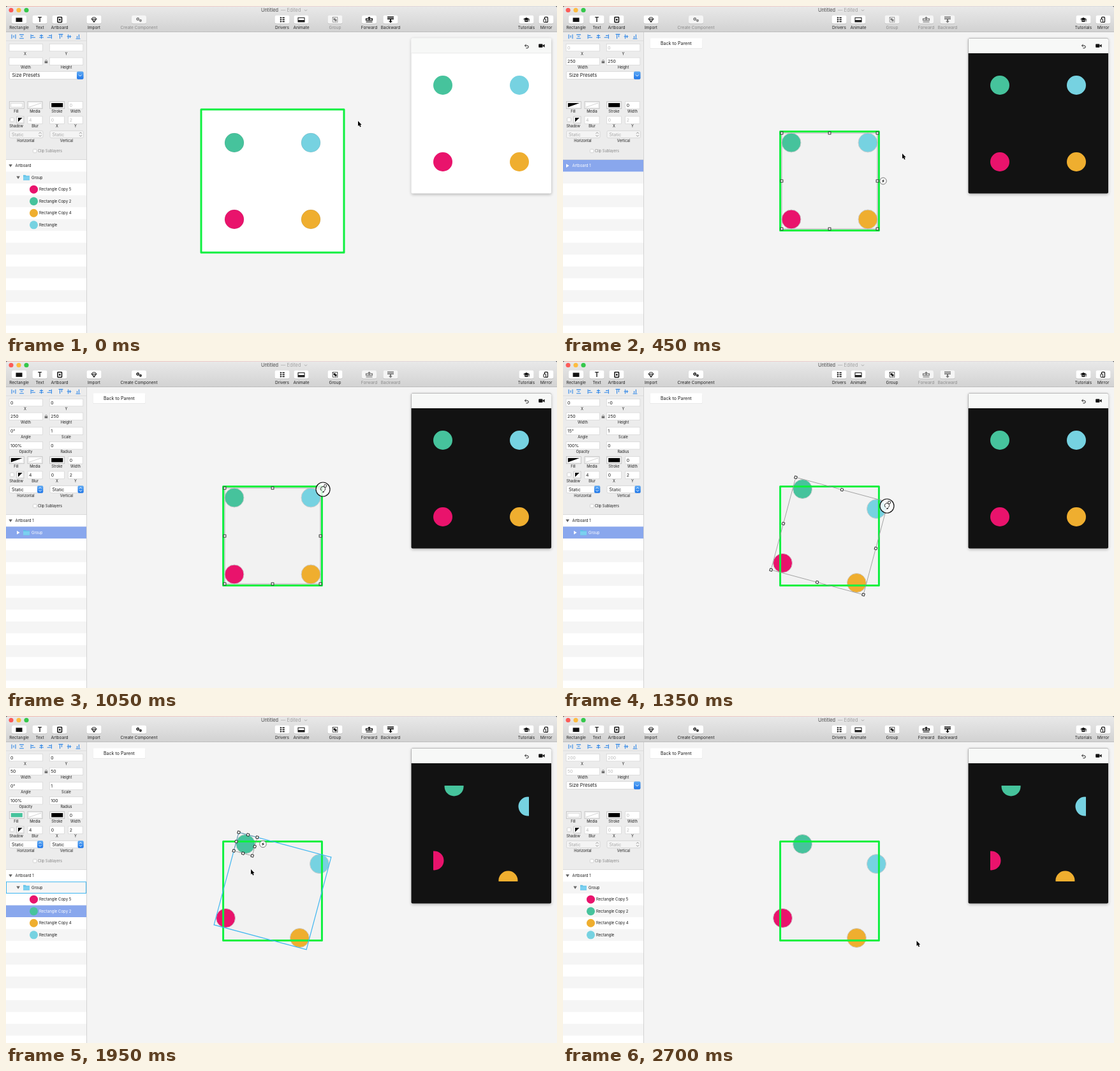
An HTML page that plays this animation: 864 by 512 pixels, repeating every 2.85 s.

```html
<!DOCTYPE html>
<html lang="en">
<head>
<meta charset="utf-8">
<title>Untitled</title>
<style>
html, body { margin: 0; width: 100%; height: 100%; overflow: hidden; background: #f4f4f4; }
svg { display: block; width: 864px; height: 512px; font-family: Inter, "Open Sans", sans-serif; }
</style>
</head>
<body>
<svg viewBox="0 0 864 512">
  <defs>
    <linearGradient id="bar" x2="0" y2="1"><stop stop-color="#e9e9e9"/><stop offset="1" stop-color="#d2d2d2"/></linearGradient>
    <linearGradient id="edge"><stop stop-color="#f3b9ae"/><stop offset=".5" stop-color="#ecd3d2"/><stop offset="1" stop-color="#d9dde0"/></linearGradient>
    <linearGradient id="pop" x2="0" y2="1"><stop stop-color="#5fabf5"/><stop offset="1" stop-color="#1f76e8"/></linearGradient>
    <filter id="soft" x="-10%" y="-10%" width="120%" height="120%"><feGaussianBlur stdDeviation="2.5"/></filter>
    <clipPath id="crop"><rect x="-75" y="-75" width="150" height="150"/></clipPath>
  </defs>
  <g id="stage"></g>
</svg>
<script>
const STEP = 150, LOOP = 2850;
const BLUE = '#2f86e6', HOVER = '#3fb6f0', GREEN = '#0df03f', PICK = '#89a7ed';
const INK = '#1c1c1c', DIM = '#a6a6a6';

// Dots in list order, offset from the group centre
const dots = [
  { name: 'Rectangle Copy 5', color: '#e9136c', x: -60, y: 60, pos: ['-0', '200'] },
  { name: 'Rectangle Copy 2', color: '#46c39c', x: -60, y: -60, pos: ['0', '0'] },
  { name: 'Rectangle Copy 4', color: '#efae2f', x: 60, y: 60, pos: ['200', '200'] },
  { name: 'Rectangle', color: '#76d2e1', x: 60, y: -60, pos: ['200', '-0'] }
];
const PINK = 0, TEAL = 1, AMBER = 2, SKY = 3;

// sel: selected layer, tip: pointer, hover: group outline
const steps = [
  { tip: [552, 180] },
  { tip: [549, 192] },
  { sel: 'group', tip: [541, 212] },
  { sel: 'board', tip: [532, 231] },
  { sel: 'group', tip: [512, 222] },
  { sel: 'group', tip: [492, 210], hover: true },
  { sel: 'group', tip: [494, 203] },
  { sel: 'group', spin: [497, 201] },
  { sel: 'group', spin: [507, 224] },
  { sel: 'group', spin: [508, 227] },
  { sel: SKY, tip: [495, 252], hover: true },
  { sel: SKY, tip: [483.5, 229] },
  { sel: TEAL, tip: [378, 199] },
  { sel: TEAL, tip: [384, 240], hover: true },
  { sel: PINK, tip: [347, 315] },
  { sel: PINK, tip: [372, 304], hover: true },
  { sel: PINK, tip: [424, 329], hover: true },
  { sel: AMBER, tip: [461, 345] },
  { tip: [554.5, 352], last: ['200', '200', '50', '50'] }
];

const rect = (x, y, w, h, fill, more = '') => `<rect x="${x}" y="${y}" width="${w}" height="${h}" fill="${fill}" ${more}/>`;
const circle = (x, y, r, fill, more = '') => `<circle cx="${x}" cy="${y}" r="${r}" fill="${fill}" ${more}/>`;
const path = (d, fill, more = '') => `<path d="${d}" fill="${fill}" ${more}/>`;
const line = (d, color, w = 1, more = '') => path(d, 'none', `stroke="${color}" stroke-width="${w}" ${more}`);
const at = (x, y, body, more = '') => `<g transform="translate(${x} ${y}) ${more}">${body}</g>`;
// y is the middle of the line
const text = (s, x, y, size, color = INK, anchor = 'start', more = '') =>
  `<text x="${x}" y="${y + size * .36}" font-size="${size}" fill="${color}" text-anchor="${anchor}" ${more}>${s}</text>`;
const label = (s, x, y, size = 5.7, color = INK) => text(s, x, y, size, color, 'middle');

const icons = {
  Rectangle: c => rect(-5, -3, 10, 6.5, c),
  Text: c => text('T', 0, .2, 10, c, 'middle', 'font-weight="600"'),
  Artboard: c => rect(-3, -4, 6.5, 8, 'none', `stroke="${c}" stroke-width="1.5" rx=".6"`) + rect(-1, -1.2, 2.5, 2.5, c),
  Import: c => line('M-4-1L-2-3.5H2L4-1 0 4ZM-4-1H4M-2-1L0 4 2-1', c, .9),
  'Create Component': c => circle(-1.8, -1, 1.7, 'none', `stroke="${c}" stroke-width="1.5"`) + circle(2.4, 1.4, 1.3, 'none', `stroke="${c}" stroke-width="1.3"`),
  Drivers: c => [-3, 0, 3].map(y => circle(-2.2, y, 1.1, c) + rect(.8, y - .8, 3, 1.6, c)).join('') + line('M-2-3H2M-2 0H2M-2 3H2', c, .5),
  Animate: c => rect(-5, -3, 10, 6.5, 'none', `stroke="${c}" stroke-width="1"`) + rect(-5, .7, 10, 2.6, c),
  Group: c => rect(-3.8, -3.8, 7.6, 7.6, 'none', `stroke="${c}" stroke-width="1" stroke-dasharray="2 .8"`) + rect(-2.4, -2.2, 3, 3, c) + rect(-.6, -.6, 3, 3, c),
  Forward: c => path('M0-5L3-2H1V1H-1V-2H-3Z', c) + line('M-2-1.5H-5V1H5V-1.5H2M-5 3.5H5', c, 1.2),
  Backward: c => line('M-5-4H5M-5-1.3H5', c, 1.6) + path('M0 5L3 2H1V-1H-1V2H-3Z', c),
  Tutorials: c => path('M-5-1L0-3.3 5-1 0 1.3Z', c) + path('M-3 .7L0 2.1 3 .7V2.6Q0 4.4-3 2.6Z', c) + line('M4.3-1V3', c, .8),
  Mirror: c => rect(-2.5, -4, 5, 8, 'none', `stroke="${c}" stroke-width="1.2" rx="1"`) + rect(-4, -1, 3.5, 5, '#fff', `stroke="${c}" stroke-width="1" rx=".7"`)
};
const places = [20.5, 53, 84, 138, 208.5, 433, 463, 516, 569.5, 603, 816, 847];

function toolbar(off) {
  let out = rect(0, 0, 864, 41, 'url(#bar)') + rect(0, 40, 864, 1, '#bdbdbd') + rect(0, 0, 864, 1, 'url(#edge)')
    + path('M0 0H3Q0 0 0 3Z', '#444') + path('M864 0H861Q864 0 864 3Z', '#444');
  ['#fc5b57', '#fdbc40', '#34c84a'].forEach((c, i) => out += circle(8 + 12 * i, 6.5, 3.6, c));
  out += text('Untitled', 400, 6.5, 7.4, '#4a4a4a') + text('— Edited', 431, 6.5, 7.4, '#a2a2a2') + line('M468 5.7L470 7.7 472 5.7', '#999', .8);
  Object.keys(icons).forEach((name, i) => {
    const faded = off.includes(name), x = places[i];
    out += rect(x - 11.5, 15.3, 23, 13, '#b9b9b9', 'rx="2.5"')
      + rect(x - 11.5, 14.8, 23, 12.8, faded ? '#f5f5f5' : '#fff', 'rx="2.5"')
      + at(x, 21.4, icons[name](faded ? '#777' : '#111')) + label(name, x, 33.6, 6.5, faded ? '#8b8b8b' : '#222');
  });
  return out;
}

function alignBar() {
  const bars = ['M-3.5-4V4M3.5-4V4M0-2V2', 'M-4-3.5H4M-4 3.5H4M-2 0H2', 'M-4-4V4M-3-1.7H1M-3 1.7H4', 'M0-4V4M-3-1.7H3M-4 1.7H4',
    'M4-4V4M3-1.7H-1M3 1.7H-4', 'M-4-4H4M-1.7-3V4M1.7-3V1', 'M-4 0H4M-1.7-4V4M1.7-2.5V2.5', 'M-4 4H4M-1.7 3V-1M1.7 3V-4'];
  const xs = [12, 24.5, 42.5, 55.5, 68, 86, 99, 113];
  return bars.map((d, i) => at(xs[i], 47.8, line(d, BLUE, 1.3), 'scale(.85)')).join('') + rect(0, 54, 126, 1, '#dedede');
}

const box = (x, y, w, h = 11.5) => rect(x, y, w, h, '#fff', 'stroke="#d3d3d3" stroke-width=".7"');
const field = (x, y, w, s, on) => box(x, y, w) + text(s, x + 2, y + 6, 6.8, on ? INK : '#b9b9b9');
const swatch = (x, inner) => rect(x, 149.7, 23, 11, '#f3f3f3', 'stroke="#bcbcbc" stroke-width=".8"') + inner;
const check = (x, y, s) => rect(x, y, s, s, '#fff', 'stroke="#c4c4c4" stroke-width=".7" rx="1"');

function popup(x, on) {
  const c = on ? '#fff' : '#8a8a8a';
  return rect(x, 195.4, 52.5, 11.2, on ? '#fff' : '#f4f4f4', 'stroke="#cfcfcf" stroke-width=".7" rx="2"')
    + (on ? rect(x + 43.5, 195.2, 9.2, 11.6, 'url(#pop)', 'rx="2"') : '')
    + text('Static', x + 3.5, 201, 7, on ? INK : DIM)
    + line(`M${x + 46} 199.8l2-2 2 2M${x + 46} 202.2l2 2 2-2`, c, .9);
}

function inspector(s) {
  const dot = dots[s.sel], group = s.sel === 'group', board = s.sel === 'board', on = !!dot || group;
  let v = s.last || ['', '', '', ''];
  if (board) v = ['0', '0', '250', '250'];
  if (group) v = ['0', s.turn ? '-0' : '0', '250', '250'];
  if (dot) v = [...dot.pos, '50', '50'];
  let out = rect(0, 41, 126, 200, '#ececec') + alignBar()
    + field(5, 59.3, 52.5, v[0], on) + field(68.3, 59.3, 52.5, v[1], on)
    + label('X', 30, 74.7) + label('Y', 94.5, 74.7)
    + field(5, 81, 52.5, v[2], on || board) + field(68.3, 81, 52.5, v[3], on || board)
    + label('Width', 31, 96.3) + label('Height', 94.5, 96.3)
    + rect(60.6, 86.5, 4.6, 3, '#666') + line('M61.6 86.5V85.2Q63 83.4 64.3 85.2V86.5', '#777', .7);
  if (on) {
    out += field(5, 103.8, 52.5, s.turn && group ? '15°' : '0°', true) + field(68.3, 103.8, 52.5, '1', true)
      + label('Angle', 31, 119.3) + label('Scale', 94.5, 119.3)
      + field(5, 126.6, 52.5, '100%', true) + field(68.3, 126.6, 52.5, dot ? '100' : '0', true)
      + label('Opacity', 31, 142) + label('Radius', 94.5, 142);
  } else {
    out += rect(5.3, 102.6, 116, 12, '#fff', 'stroke="#cfcfcf" stroke-width=".7" rx="2"')
      + rect(111, 102.4, 10.5, 12.4, 'url(#pop)', 'rx="2"') + line('M114 107.6L116.3 109.9 118.6 107.6', '#fff', 1)
      + text('Size Presets', 9.5, 108.6, 7.5);
  }
  let fill = rect(7.8, 152.2, 18, 6, '#fff', 'stroke="#c8c8c8" stroke-width=".6"');
  if (dot) fill = rect(7.8, 152, 18, 6.4, dot.color);
  if (group || board) fill = rect(7.8, 152, 18, 6.4, '#fff') + path('M7.8 158.4V152H25.8Z', '#000');
  out += swatch(5.3, fill) + swatch(34, rect(36, 152, 19, 6.4, '#fff') + line('M36 158.4L55 152', '#c2c2c2', .7))
    + swatch(68.7, rect(71.2, 152, 18, 6.4, '#000')) + field(97.7, 149.5, 22.5, '0', on || board)
    + label('Fill', 16, 165) + label('Media', 45.5, 165) + label('Stroke', 80, 165) + label('Width', 109, 165)
    + check(6.5, 175, 6) + rect(16.7, 173, 11.3, 10.5, '#f3f3f3', 'stroke="#bcbcbc" stroke-width=".7"')
    + rect(19, 175, 6.6, 6.5, '#fff') + path('M19 181.5V175H25.6Z', '#000')
    + field(34, 172.8, 23, '4', on) + field(68.7, 172.8, 22.8, '0', on) + field(97.7, 172.8, 22.5, '2', on)
    + label('Shadow', 16, 188.4) + label('Blur', 45.5, 188.4) + label('X', 80, 188.4) + label('Y', 109, 188.4)
    + popup(5.5, on) + popup(69, on) + label('Horizontal', 31, 210.6) + label('Vertical', 95, 210.6)
    + check(42.5, 224.3, 5.4) + text('Clip Sublayers', 50, 227, 5.6, group ? INK : '#858585');
  return out;
}

const ROW = 18.55, TOP = 240.8;
const arrow = (x, y, open, c) => path(open ? `M${x - 2.7} ${y - 2.2}h5.6l-2.8 4.6z` : `M${x - 2} ${y - 2.8}v5.6l4.6-2.8z`, c);

function layers(s) {
  let out = rect(0, 240.5, 126, 272, '#fff');
  for (let i = 1; i < 15; i += 2) out += rect(0, TOP + ROW * i, 126, ROW, '#f5f5f5');
  const board = s.sel === 'board', group = s.sel === 'group';
  const pick = i => rect(0, TOP + ROW * i, 126, ROW, PICK);
  const mid = i => TOP + ROW * (i + .5);
  if (board) out += pick(0);
  out += arrow(7, mid(0), !board, board ? '#fff' : '#666') + text(s.nested ? 'Artboard 1' : 'Artboard', 14.5, mid(0), 6, board ? '#fff' : INK);
  if (!board) {
    const y = mid(1);
    if (group) out += pick(1);
    out += arrow(19, y, s.open, group ? '#fff' : '#666')
      + path(`M27 ${y - 4}h3.6l1 1h5.4v7h-10z`, '#5bbfe6') + rect(27, y - 2, 10, 6, '#7bd0f0')
      + text('Group', 40, y, 6, group ? '#fff' : INK);
    if (s.hover && s.open) out += rect(.5, TOP + ROW + .4, 125, ROW - .8, 'none', `stroke="${HOVER}"`);
  }
  if (s.open) dots.forEach((d, i) => {
    const y = mid(i + 2), on = s.sel === i;
    out += (on ? pick(i + 2) : '') + circle(43.5, y, 6.5, d.color) + text(d.name, 52, y, 6.04, on ? '#fff' : INK);
  });
  return out + rect(0, 240, 126, .8, '#d4d4d4') + rect(126, 41, 1, 471, '#d3d3d3');
}

const ring = turn => dots.map(d => {
  const a = turn * Math.PI / 180, c = Math.cos(a), n = Math.sin(a);
  return { color: d.color, x: d.x * c - d.y * n, y: d.x * n + d.y * c };
});

function preview(s) {
  const shown = ring(s.cut ? 15 : 0).map(d => circle(d.x, d.y, 15, d.color)).join('');
  return rect(636, 52, 219, 243, '#000', 'opacity=".28" filter="url(#soft)"')
    + rect(635.5, 50.5, 219.5, 243, s.nested ? '#121212' : '#fff', 'rx="2"')
    + path('M635.5 74V52.5Q635.5 50.5 637.5 50.5H853Q855 50.5 855 52.5V74Z', '#f7f8f7')
    + (s.nested ? '' : rect(635.5, 73.5, 219.5, .7, '#e3e3e3'))
    + line('M815.5 60.2L813.5 62 815.5 63.8M813.7 62H817Q819.3 62 819.3 64T817 66H815.5', '#222', 1)
    + rect(835.2, 59.5, 6.3, 5.4, '#111', 'rx="1"') + path('M841 62.2L844.6 59.8V64.7Z', '#111')
    + at(745, 184, `<g clip-path="url(#crop)">${shown}</g>`);
}

const handle = (x, y) => rect(x - 1.9, y - 1.9, 3.8, 3.8, '#fff', 'stroke="#222" stroke-width=".9"');

function selection(x, y, half, turn, color, badge) {
  let out = rect(-half, -half, 2 * half, 2 * half, 'none', `stroke="${color}" stroke-width=".8"`);
  for (const i of [-1, 0, 1]) for (const j of [-1, 0, 1]) if (i || j) out += handle(i * half, j * half);
  out = at(x, y, out, `rotate(${turn})`);
  if (badge) {
    const a = turn * Math.PI / 180, bx = x + half * (Math.cos(a) + Math.sin(a)) + 9;
    out += at(bx, y, circle(0, 0, 5.2, '#fff', 'stroke="#555" stroke-width=".8"') + path('M1-3L-2 .5H-.2L-1 3 2-.6H.2Z', '#111'));
  }
  return out;
}

function pointer(s) {
  if (s.spin) return at(...s.spin, circle(0, 0, 11, '#fff', 'fill-opacity=".8" stroke="#111" stroke-width="1.2"')
    + line('M-2 2.2A3.6 3.6 0 1 1 2 2.2', '#222', 1) + path('M-1.6 4.2L2.6 2.2 1.2 5Z', '#111')
    + rect(.3, -8, 3.6, 3.6, '#fff', 'stroke="#222" stroke-width=".8" transform="rotate(15)"'));
  return at(...s.tip, path('M0 0V8L1.8 6.4 3.1 9.4 4.7 8.7 3.4 5.9H5.7Z', '#000', 'stroke="#fff" stroke-width=".7" paint-order="stroke"'));
}

function canvas(s) {
  const half = s.nested ? 77.4 : 112, seen = ring(s.turn);
  let out = rect(127, 41, 737, 471, '#f4f4f4');
  if (s.nested) out += rect(136.5, 51, 82, 16, '#d6d6d6', 'rx="2"') + rect(136.5, 50.5, 82, 16, '#fff', 'rx="2"') + label('Back to Parent', 177.3, 58.5, 7.1)
    + rect(343, 199, 150, 150, '#f2f2f2');
  else out += rect(306, 162, 224, 224, '#fff');
  const halo = s.nested ? 'stroke="#cfcfcf" stroke-width="1"' : 'stroke="#000" stroke-opacity=".15" stroke-width=".6"';
  out += at(418, 274, seen.map(d => circle(d.x, d.y, 15, d.color, halo)).join(''))
    + rect(418 - half, 274 - half, 2 * half, 2 * half, 'none', `stroke="${GREEN}" stroke-width="3" stroke-linejoin="round"`);
  if (s.hover && s.turn) out += at(418, 274, rect(-75, -75, 150, 150, 'none', `stroke="${HOVER}" stroke-width="1.2"`), 'rotate(15)');
  const d = seen[s.sel];
  if (d) out += selection(418 + d.x, 274 + d.y, 15, s.turn, '#999', true);
  else if (s.sel) out += selection(418, 274, 75, s.turn, s.hover ? HOVER : '#999', !s.spin);
  return out;
}

function disabled(s, i) {
  const off = [];
  if (!s.sel && !s.nested || s.sel === 'board') off.push('Create Component', 'Group');
  if (s.sel === 'board' || s.sel === 'group' || s.sel === PINK) off.push('Forward');
  if (s.sel === 'board' || s.sel === 'group' || s.sel === SKY) off.push('Backward');
  return i < 2 ? ['Create Component', 'Group'] : off;
}

const stage = document.getElementById('stage');
let shown = -1;

function draw(i) {
  const s = { ...steps[i], nested: i >= 3, open: i < 3 || i >= 10, turn: i >= 8 ? 15 : 0, cut: i >= 10 };
  stage.innerHTML = canvas(s) + preview(s) + inspector(s) + layers(s) + toolbar(disabled(s, i)) + pointer(s);
}

const start = performance.now();
function tick() {
  const i = Math.floor((performance.now() - start) % LOOP / STEP);
  if (i !== shown) draw(shown = i);
  requestAnimationFrame(tick);
}
tick();
</script>
</body>
</html>
```
